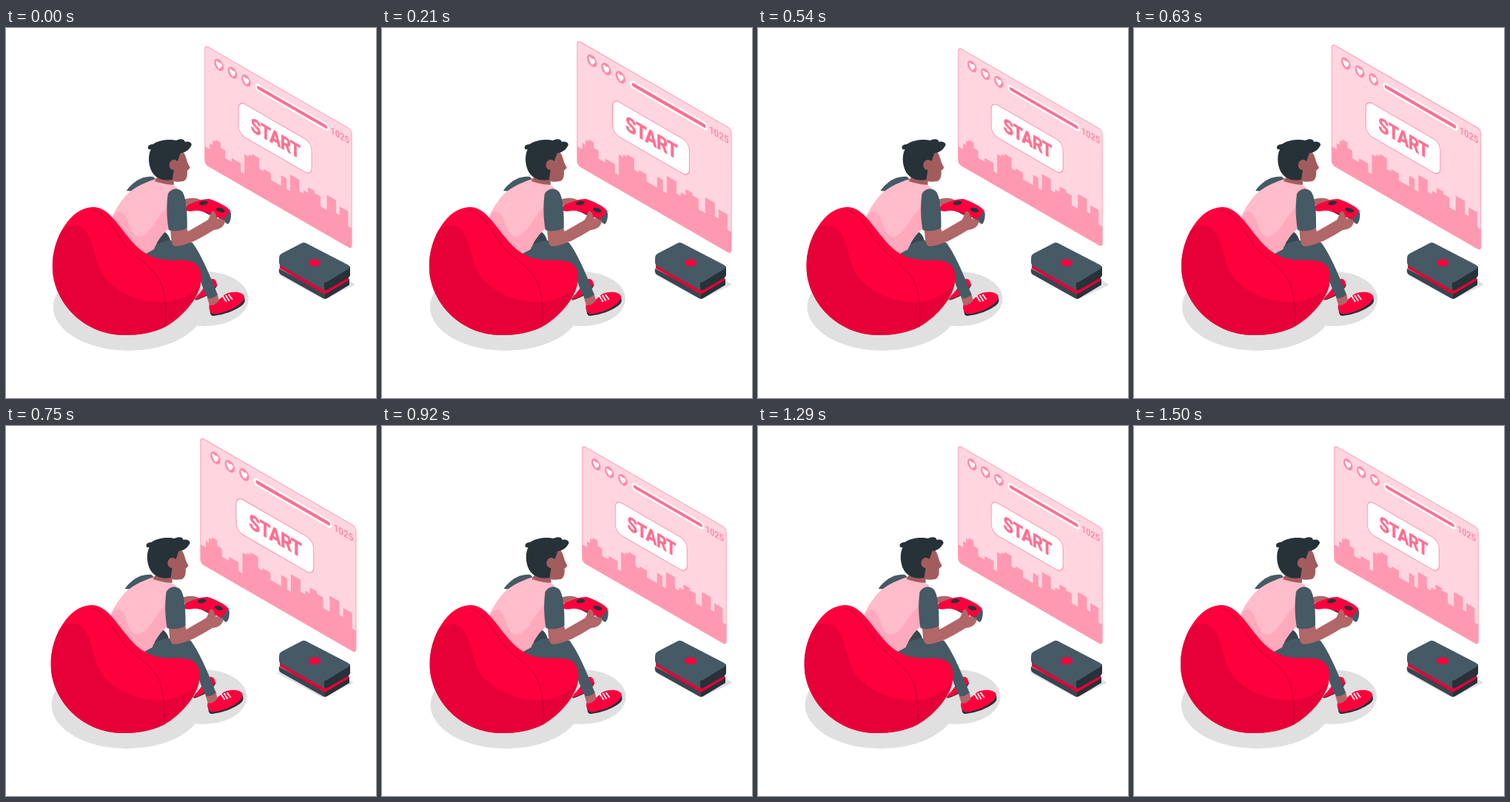
An HTML page for the animation above (1540 ms loop, 500x500 px).

```html
<!DOCTYPE html>
<html lang="en">
<head>
<meta charset="utf-8">
<title>Gamer</title>
<style>
  html, body { margin: 0; height: 100%; overflow: hidden; background: #fff; }
  svg { display: block; width: 100vw; height: 100vh; }
  text { font-family: Roboto, sans-serif; font-weight: 700; text-anchor: middle; }
  .red { fill: #ff003d; }
  .deep { fill: #e60037; }
  .slate { fill: #455a64; }
  .dusk { fill: #37474f; }
  .ink { fill: #263238; }
  .skin { fill: #b16668; }
  .shade { fill: #e0e0e0; }
  .rose { fill: #ff8ba7; }
</style>
</head>
<body>
<svg viewBox="0 0 500 500">
  <defs>
    <clipPath id="frame"><rect width="224.6" height="157.5" rx="5"/></clipPath>
    <clipPath id="seat"><use href="#bag"/></clipPath>
    <g id="life">
      <circle r="7.2" class="rose"/>
      <path d="M0 5C-8 -1 -4 -6 0 -2.5C4 -6 8 -1 0 5Z" fill="#fff"/>
    </g>
  </defs>

  <g id="screen">
    <g transform="matrix(.866 .5 0 1 270.7 26)">
      <rect width="224.6" height="157.5" rx="5" fill="#ffd6df"/>
      <path id="skyline" fill="#ff99b1" clip-path="url(#frame)"/>
      <rect width="224.6" height="157.5" rx="5" fill="none" stroke="#ff99b1"/>
      <use href="#life" x="21.4" y="15.3"/>
      <use href="#life" x="42.2" y="15.3"/>
      <use href="#life" x="63" y="15.3"/>
      <g stroke-linecap="round">
        <path d="M82 15.5H185" stroke="#fff" stroke-width="10"/>
        <path d="M82 15.5H185" stroke="#ff6f91" stroke-width="4.6"/>
      </g>
      <text x="206.5" y="20.5" font-size="12.5" class="rose">1025</text>
      <rect x="51.4" y="47.5" width="112" height="44" rx="10" fill="#fff" stroke="#ff8ba7"/>
      <text x="108" y="78" font-size="25.5" letter-spacing="-.6" fill="#ff6f91" stroke="#ff6f91" stroke-width=".6">START</text>
    </g>
  </g>

  <g class="shake">
    <path class="shade" d="M367 333L430 367 472 347 462 340Z"/>
  </g>

  <g id="console">
    <path class="dusk" d="M369 325L431 358 464 340V347L434 365Q431 367 428 365L371 333Q368 331 369 325Z"/>
    <path class="ink" d="M431 357L464 339V347L434 365 431 366Z"/>
    <path class="deep" d="M370 318L431 352 463 335V341L431 360 370 325Z"/>
    <path class="slate" d="M369 310L431 344V355L372 322Q369 320 369 317Z"/>
    <path class="ink" d="M430 343L465 322V334Q465 336 462 338L434 354Q431 355 430 353Z"/>
    <path class="slate" d="M372 305L399 291Q402 289 406 291L462 320Q467 323 462 326L434 343Q431 345 427 343L371 312Q367 309 372 305Z"/>
    <ellipse class="red" cx="417" cy="317.3" rx="8" ry="4.8"/>
  </g>

  <g class="shake">
    <ellipse class="shade" cx="166" cy="377" rx="102" ry="59"/>
    <ellipse class="shade" cx="268" cy="366" rx="60" ry="37"/>

    <!-- shoes and legs -->
    <path class="ink" d="M256 368C268 365 282 357 286 347L282 344 258 362Z"/>
    <path class="red" d="M255 366C263 358 269 348 275 341C281 336 285 341 285 347C281 356 268 364 255 367Z"/>
    <path class="ink" d="M275 377C276 384 276 389 280 389C294 388 313 381 321 373C324 370 323 366 322 364Z"/>
    <path class="red" d="M275 374C283 373 290 365 296 360C304 356 318 355 322 362C324 369 312 377 303 381C293 385 284 387 279 386C275 383 274 378 275 374Z"/>
    <path class="skin" d="M272 364L286 359 288 368C285 373 279 376 275 374Z"/>
    <path d="M293 362L298 370M297 361L302 369M301 360L306 367" stroke="#fff" stroke-width="1.8"/>
    <path class="dusk" d="M203 298C203 285 207 273 212 274C219 277 222 284 223 290Z"/>
    <path class="slate" d="M187 306C196 298 206 288 222 287L252 290C262 303 273 327 286 360C283 364 277 366 273 365C267 354 264 345 262 338L240 325 200 318Z"/>

    <!-- torso -->
    <path class="slate" d="M163 220C171 208 185 199 199 201L204 206 176 221Z"/>
    <path fill="#ffbccb" d="M203 204C185 209 167 219 159 230C150 242 144 252 143 259C150 272 165 294 187 306L200 299C203 290 212 277 220 271L219 248 222 225 232 216C225 210 212 206 203 204Z"/>
    <path fill="#ffa9bd" d="M143 259C147 250 152 246 157 249C167 256 166 281 180 282C196 281 205 250 221 240L220 271C212 277 203 290 200 299L187 306C165 294 150 272 143 259Z"/>

    <!-- hands and controller -->
    <path class="skin" d="M240 232C250 229 258 229 264 233L258 241 243 239Z"/>
    <path class="slate" d="M296 249L304 249C305 256 303 264 300 265C296 263 293 259 287 257Z"/>
    <path class="ink" d="M243 245C254 245 264 246 272 251L285 257 288 252 250 240Z"/>
    <path class="red" d="M244 240C252 236 264 231 275 231C286 235 300 241 304 248C301 249 298 254 295 258C290 258 284 255 279 253C271 249 263 246 255 247C249 248 245 248 243 246Z"/>
    <g class="ink">
      <ellipse cx="267" cy="236.5" rx="6" ry="2.8" transform="rotate(-8 267 236.5)"/>
      <ellipse cx="290" cy="246" rx="6" ry="2.8" transform="rotate(15 290 246)"/>
    </g>
    <path class="skin" d="M222 271C224 282 222 294 230 295C246 294 265 283 281 273C290 272 296 268 296 260L285 257C284 249 280 245 278 249C275 254 275 258 272 260L246 275 244 268Z"/>
    <path class="slate" d="M219 224C224 216 233 215 239 222C245 233 245 255 245 270C237 275 227 275 220 273C217 255 217 239 219 224Z"/>

    <!-- head -->
    <path fill="#a35c5e" d="M203 203L218 196 221 180 238 166C243 170 244 178 246 183L249 189 245 193C246 199 244 206 240 207C235 208 229 208 227 207L227 212C218 212 208 209 201 207Z"/>
    <path class="ink" d="M193 164C190 160 194 157 199 157C207 151 222 150 230 152C236 149 242 150 242 154C249 152 253 157 250 160C247 166 240 169 236 169L232 180C228 176 222 178 221 184C220 189 224 192 227 192L225 205C216 207 206 205 200 198C193 190 191 174 196 164Z"/>

    <!-- beanbag -->
    <path id="bag" class="red" d="M63 322C63 284 87 243 117 242C137 241 150 264 165 282C179 300 194 311 213 313C235 316 264 306 264 338C264 362 240 390 215 404C199 412 180 415 160 415C105 415 63 370 63 322Z"/>
    <g clip-path="url(#seat)">
      <path class="deep" d="M60 300C72 272 82 265 95 267C123 272 115 322 139 343C160 364 195 373 218 370C240 367 256 356 268 340V420H60Z"/>
      <path d="M117 246C137 249 148 278 165 298C183 317 206 326 213 355C217 375 217 392 216 404" fill="none" stroke="#c2002f"/>
    </g>
  </g>
</svg>

<script>
  const LOOP = 1540, CYCLE = 1500, FPS = 24, LEAD = 30;
  // [fraction of the cycle, value]
  const BEAT = [[0, 1], [.1, 1.1], [.3, 1], [.4, 1], [.5, 1.1], [.6, 1], [1, 1]];
  const SHAKE = [0, -1, 2, -4, 4, -4, 4, -4, 2, -1, 0].map((x, i) => [i / 10, x]);
  // [left, top] of each roof
  const ROOFS = [
    [0, 134], [7.5, 126], [12, 120], [16, 117], [24, 124], [31, 134], [41, 129], [55, 140],
    [60.5, 114], [67, 111], [72, 108], [83, 122], [89.5, 119], [101, 128], [116.5, 114],
    [125, 128], [130.5, 106], [144.5, 121], [151, 116.5], [158, 109], [168, 112],
    [177, 125], [186.6, 105], [200.6, 122], [206, 110.5], [219, 130]
  ];

  const screen = document.getElementById('screen');
  const shakers = document.querySelectorAll('.shake');
  document.getElementById('skyline').setAttribute('d',
    'M0 158' + ROOFS.map(([x, y]) => `H${x}V${y}`).join('') + 'H225V158Z');

  function sample(keys, p) {
    const i = Math.max(1, keys.findIndex(k => k[0] >= p));
    const [p0, a] = keys[i - 1], [p1, b] = keys[i];
    return a + (b - a) * (p - p0) / (p1 - p0);
  }

  function draw(now) {
    const step = Math.min(36, Math.floor(now % LOOP * FPS / 1000 + .1));
    const p = Math.min(1, (step * 1000 / FPS + LEAD) / CYCLE);
    screen.setAttribute('transform',
      `translate(368 161.3) scale(${sample(BEAT, p)}) translate(-368 -161.3)`);
    shakers.forEach(g => g.setAttribute('transform', `translate(${sample(SHAKE, p)})`));
    requestAnimationFrame(draw);
  }
  draw(0);
</script>
</body>
</html>
```
